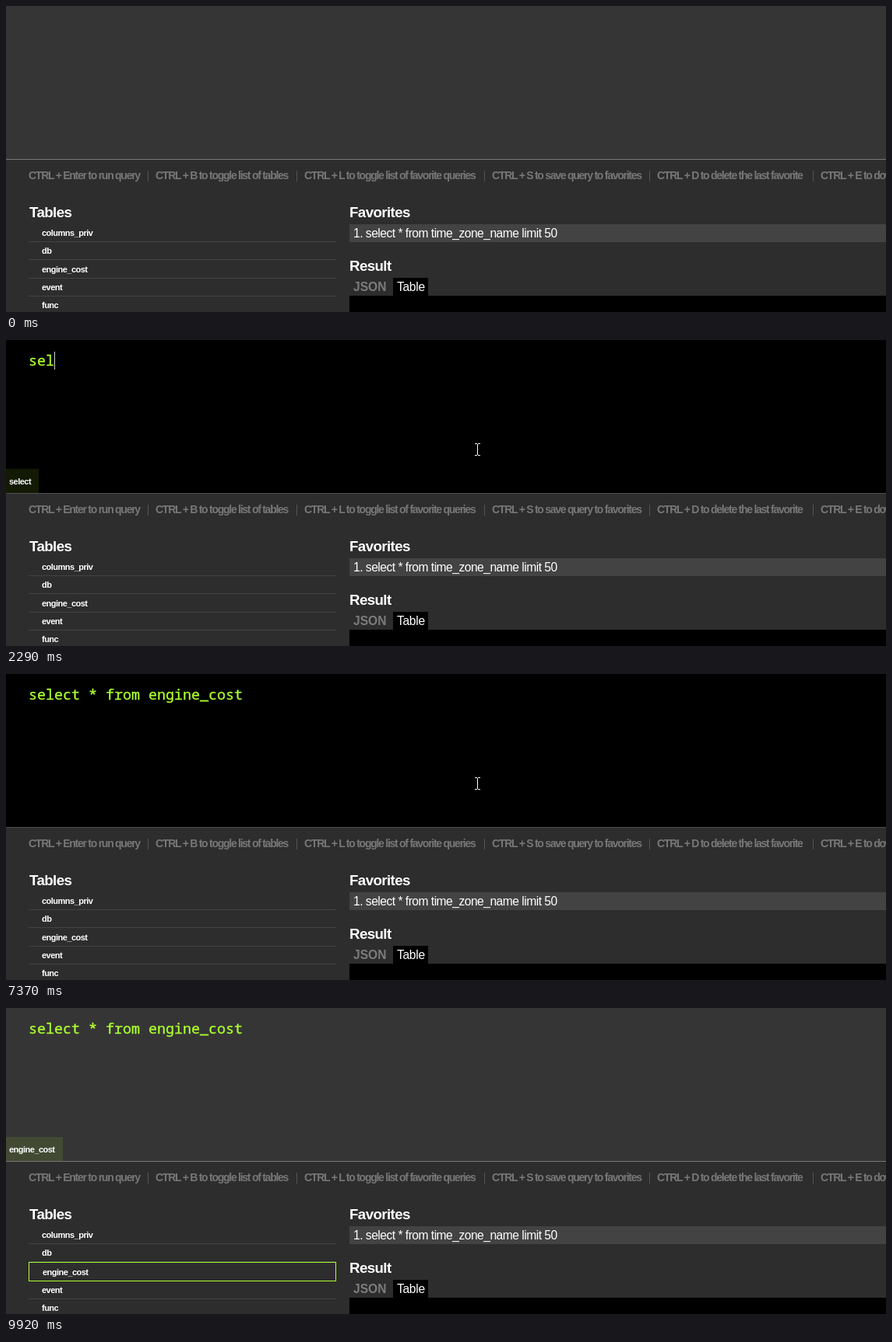
Recreate the animation shown at these times as an HTML page. Size 1130 by 394 pixels, loop 10000 ms.

```html
<!DOCTYPE html>
<html lang="en">
<head>
<meta charset="utf-8">
<title>Query console</title>
<style>
  html, body { margin: 0; width: 100%; height: 100%; overflow: hidden; background: #2d2d2d; }
  svg { display: block; }
  text { font-family: "Liberation Sans", Arial, sans-serif; fill: #fff; white-space: pre; }
  rect, path { shape-rendering: crispEdges; }
  .heading { font-size: 18.72px; font-weight: bold; letter-spacing: -.6px; }
  .hint { font-size: 14px; font-weight: bold; letter-spacing: -1.26px; fill: #777; }
  .small { font-size: 11px; font-weight: bold; letter-spacing: -.52px; }
  .body { font-size: 15.6px; letter-spacing: -.5px; }
  .tab { font-size: 15.6px; letter-spacing: -.3px; }
  .inactive { font-weight: bold; letter-spacing: 0; fill: #7c7c7c; }
  #query { font: 18.33px "Noto Sans Mono", monospace; fill: #adff2f; stroke: #adff2f; stroke-width: .35px; }
</style>
</head>
<body>
<svg id="stage" width="1130" height="394" viewBox="0 0 1130 394">
  <rect id="editor" width="1130" height="197"/>
  <rect id="divider" y="197" width="1130" height="1"/>
  <text id="query" x="29" y="33"></text>
  <rect id="caret" y="15" width="1" height="23" fill="#ccc"/>
  <g id="tag">
    <rect y="166" height="31" fill="#adff2f" fill-opacity=".1"/>
    <text class="small" x="4" y="186"></text>
  </g>

  <g id="hints"></g>

  <text class="heading" x="30" y="272">Tables</text>
  <g id="tables"></g>
  <rect id="outline" x="29.5" y="327.5" width="394" height="24" fill="none" stroke="#adff2f"/>

  <text class="heading" x="441" y="272">Favorites</text>
  <rect x="441" y="281" width="689" height="23" fill="#434343"/>
  <text class="body" x="446" y="298">1. select * from time_zone_name limit 50</text>

  <text class="heading" x="441" y="341">Result</text>
  <text class="tab inactive" x="446" y="367">JSON</text>
  <rect x="497" y="350" width="45" height="23"/>
  <text class="tab" x="502" y="367">Table</text>
  <rect x="441" y="373" width="689" height="21"/>

  <path id="beam" fill="none" stroke="#fff" d="M-3 -7.5h3M1 -7.5h3M.5 -7v14M-3 7.5h3M1 7.5h3"/>
  <path id="arrow" fill="#fff" stroke="#000" style="shape-rendering:auto"
    d="M.5 .5v16l3.7 -3.5 2.4 5.5 2.2 -1 -2.4 -5.3h4.8z"/>
</svg>
<script>
const LOOP = 10000;
const CHAR = 11;
const $ = id => document.getElementById(id);

function add(parent, name, attributes, content = '') {
  const node = document.createElementNS('http://www.w3.org/2000/svg', name);
  for (const key in attributes) node.setAttribute(key, attributes[key]);
  node.textContent = content;
  return parent.appendChild(node);
}

[
  [29, 'Enter to run query'],
  [192, 'B to toggle list of tables'],
  [383, 'L to toggle list of favorite queries'],
  [624, 'S to save query to favorites'],
  [836, 'D to delete the last favorite'],
  [1046, 'E to download result']
].forEach(([x, label], i) => {
  add($('hints'), 'text', { class: 'hint', x, y: 223 }, 'CTRL + ' + label);
  if (i) add($('hints'), 'rect', { x: x - 10, y: 212, width: 1, height: 14, fill: '#555' });
});

const rows = ['columns_priv', 'db', 'engine_cost', 'event', 'func'].map((name, i) => {
  const offset = Math.round(i * 23.3);
  return {
    label: add($('tables'), 'text', { class: 'small', x: 46, y: 296 + offset }, name),
    line: add($('tables'), 'rect', { x: 29, y: 303 + offset, width: 395, height: 1, fill: '#444' })
  };
});

const tagWidths = { select: 42, from: 36, engine_cost: 73 };
const initial = { focus: false, text: '', caret: false, tag: '', beam: null, arrow: null };

// Each entry changes part of the state at its time.
const timeline = [
  [210, { arrow: [598, 205] }],
  [290, { arrow: null, beam: [601, 176] }],
  [370, { beam: [604, 150] }],
  [440, { beam: [605, 141] }],
  [520, { focus: true, caret: true }],
  [1050, { caret: false }],
  [1510, { text: 's', caret: true }],
  [1910, { text: 'se' }],
  [2140, { tag: 'select' }],
  [2290, { text: 'sel' }],
  [2760, { text: 'select ' }],
  [2930, { tag: '' }],
  [3230, { caret: false }],
  [3630, { text: 'select *', caret: true }],
  [3950, { text: 'select * ' }],
  [4180, { text: 'select * f' }],
  [4330, { text: 'select * fr' }],
  [4410, { tag: 'from' }],
  [4790, { text: 'select * from ' }],
  [5020, { tag: '' }],
  [5340, { caret: false }],
  [5810, { text: 'select * from e', caret: true }],
  [5890, { text: 'select * from en' }],
  [6040, { text: 'select * from eng', tag: 'engine_cost' }],
  [6590, { caret: false }],
  [6820, { text: 'select * from engine_cost ', caret: true }],
  [6970, { tag: '' }],
  [7370, { caret: false }],
  [8070, { text: 'select * from engine_cost', caret: true }],
  [8380, { tag: 'engine_cost' }],
  [8610, { caret: false }],
  [9070, { beam: [640, 172] }],
  [9140, { beam: null, arrow: [735, 250], caret: true }],
  [9220, { arrow: [850, 328] }],
  [9300, { arrow: [926, 382] }],
  [9370, { arrow: null }],
  [9690, { caret: false }],
  [9920, { focus: false }]
];

function show(node, visible) {
  node.style.display = visible ? '' : 'none';
}

function place(node, position) {
  show(node, position);
  if (position) node.setAttribute('transform', `translate(${position})`);
}

function render(time) {
  const state = { ...initial };
  for (const [start, change] of timeline) {
    if (start <= time) Object.assign(state, change);
  }

  $('editor').setAttribute('fill', state.focus ? '#000' : '#353535');
  $('divider').setAttribute('fill', state.focus ? '#505050' : '#777');
  $('query').textContent = state.text;
  $('caret').setAttribute('x', 29 + CHAR * state.text.length);
  show($('caret'), state.caret);

  const [tagBox, tagLabel] = $('tag').children;
  tagBox.setAttribute('width', tagWidths[state.tag] || 0);
  tagLabel.textContent = state.tag;

  // The outlined row is one pixel taller and pushes the rows below it down.
  const selected = state.tag === 'engine_cost';
  show($('outline'), selected);
  rows.forEach(({ label, line }, i) => {
    const outlined = selected && i === 2;
    const down = selected && i >= 2 ? 1 : 0;
    label.setAttribute('transform', `translate(${outlined ? 1 : 0} ${down})`);
    line.setAttribute('transform', `translate(0 ${down})`);
    show(line, !outlined);
  });

  place($('beam'), state.beam);
  place($('arrow'), state.arrow);
}

const began = performance.now();
function tick() {
  render((performance.now() - began) % LOOP);
  requestAnimationFrame(tick);
}
tick();
</script>
</body>
</html>
```
